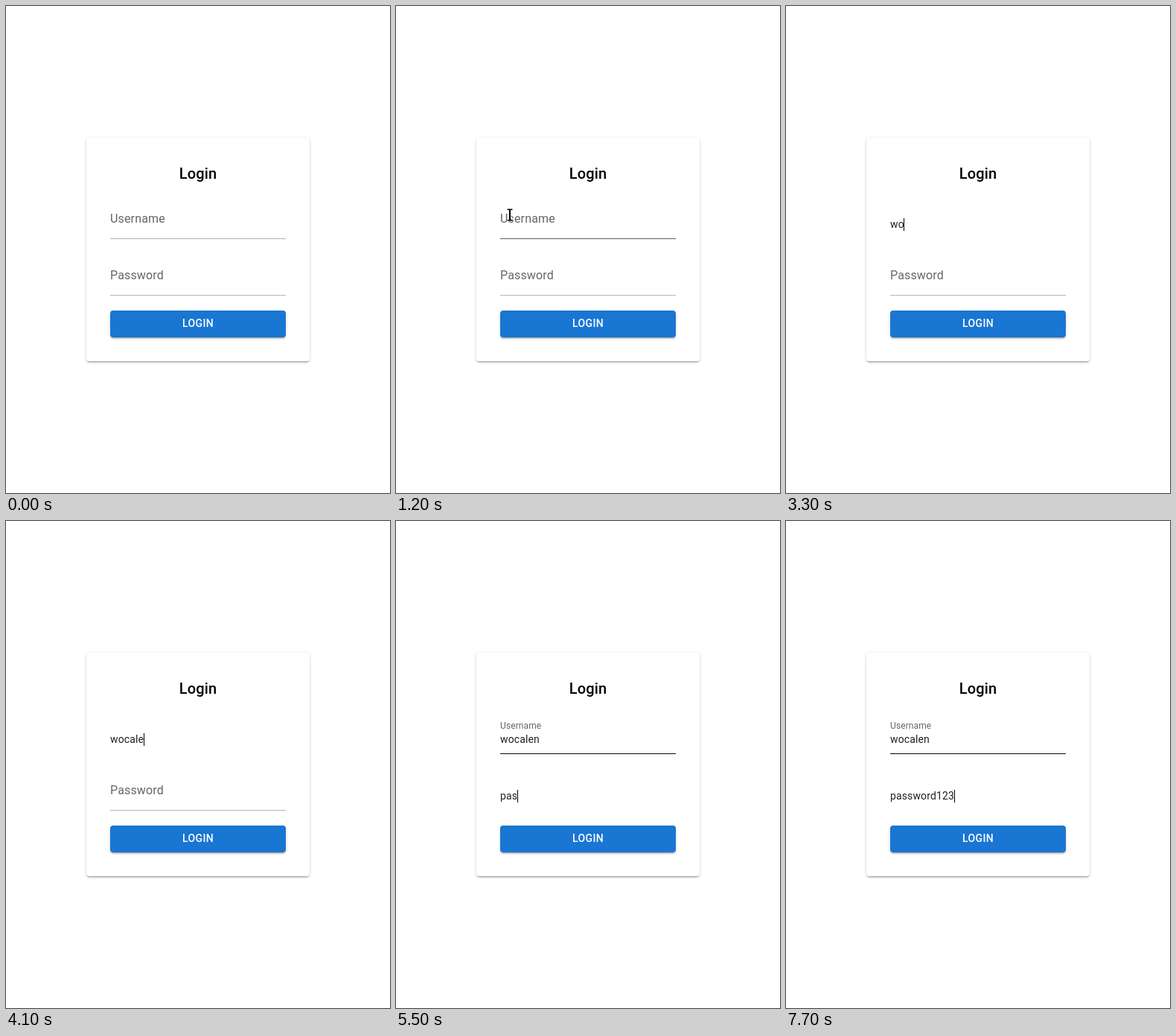
An HTML page for the animation above (8000 ms loop, 516 px wide and 654 px high).

```html
<!DOCTYPE html>
<html lang="en">
<head>
<meta charset="utf-8">
<title>Login form</title>
<style>
  html, body { margin: 0; width: 100%; height: 100%; overflow: hidden; background: #fff; }
  body { position: relative; }
  .card, .button {
    position: absolute;
    border-radius: 4px;
    box-shadow: 0 3px 1px -2px rgba(0,0,0,.2), 0 2px 2px rgba(0,0,0,.14), 0 1px 5px rgba(0,0,0,.12);
  }
  .card { left: 108px; top: 177px; width: 300px; height: 300px; background: #fff; }
  .button {
    left: 140px; top: 409px; width: 236px; height: 36px;
    background: #1976d2;
    animation: button-hover 8s linear infinite;
  }
  svg { position: absolute; left: 0; top: 0; font-family: Roboto, sans-serif; }

  .title { font-size: 20px; font-weight: 500; letter-spacing: .0075em; text-anchor: middle; }
  .action { font-size: 14px; font-weight: 500; letter-spacing: .02857em; text-anchor: middle; fill: #fff; }
  .label { font-size: 16px; letter-spacing: .00938em; fill: #666; }
  .value { font-size: 14px; letter-spacing: .00938em; fill: #212121; white-space: pre; }

  .line { fill: #b5b5b5; }
  .cover { fill: #fff; transform: scaleX(0); transform-origin: 258px 0; }

  #user .label { transform-origin: 140px 291px; animation: user-label 8s step-end infinite; }
  #user .line { animation: user-hover 8s linear infinite; }
  #user .cover { animation: user-focus 8s linear infinite; }
  #pass .label { animation: pass-label 8s step-end infinite; }
  #pass .cover { animation: pass-focus 8s linear infinite; }

  .arrow { opacity: 0; animation: arrow 8s step-end infinite; }
  .beam { opacity: 0; animation: beam 8s step-end infinite; }

  @keyframes button-hover {
    0%, 2.4% { background: #1976d2; }
    3.75% { background: #176dc9; }
    6.25%, 100% { background: #1976d2; }
  }
  @keyframes user-label {
    0% { opacity: 1; transform: none; }
    18.75% { opacity: 0; transform: translateY(-12px) scale(.75); }
    57.5%, 100% { opacity: 1; transform: translateY(-12px) scale(.75); }
  }
  @keyframes pass-label {
    0% { opacity: 1; }
    57.5%, 100% { opacity: 0; }
  }
  @keyframes user-hover {
    0%, 6.25% { fill: #b5b5b5; }
    8.4% { fill: #222; }
    10% { fill: #8b9794; }
    11.25%, 13.75% { fill: #b5b5b5; }
    16.25%, 100% { fill: #0c0c0c; }
  }
  @keyframes user-focus {
    0%, 18.5% { transform: scaleX(0); animation-timing-function: cubic-bezier(0,0,.2,1); }
    21%, 58.61% { transform: scaleX(1); animation-timing-function: cubic-bezier(0,0,.2,1); }
    61.11%, 100% { transform: scaleX(0); }
  }
  @keyframes pass-focus {
    0%, 58.49% { transform: scaleX(0); animation-timing-function: cubic-bezier(0,0,.2,1); }
    60.99%, 100% { transform: scaleX(1); }
  }
  @keyframes arrow {
    0% { opacity: 0; transform: translate(437px, 460px); }
    1.25% { opacity: 1; transform: translate(437px, 460px); }
    2.5% { opacity: 1; transform: translate(370px, 428px); }
    3.75% { opacity: 1; transform: translate(310px, 390px); }
    5% { opacity: 1; transform: translate(262px, 352px); }
    6.25% { opacity: 1; transform: translate(222px, 318px); }
    7.5% { opacity: 1; transform: translate(178px, 270px); }
    8.75% { opacity: 1; transform: translate(146px, 190px); }
    10% { opacity: 1; transform: translate(127px, 254px); }
    12.5% { opacity: 1; transform: translate(128px, 255px); }
    13.75% { opacity: 1; transform: translate(133px, 261px); }
    15%, 100% { opacity: 0; transform: translate(140px, 268px); }
  }
  @keyframes beam {
    0% { opacity: 0; transform: translate(-6px, -4px); }
    15% { opacity: 1; transform: translate(-6px, -4px); }
    16.25% { opacity: 1; transform: translate(-3px, -2px); }
    17.5% { opacity: 1; transform: none; }
    26.25%, 100% { opacity: 0; transform: none; }
  }
</style>
</head>
<body>
<div class="card"></div>
<div class="button"></div>
<svg width="516" height="654" viewBox="0 0 516 654">
  <text class="title" x="258" y="232">Login</text>
  <g id="user">
    <text class="label" x="140" y="291">Username</text>
    <text class="value" x="140" y="298"></text>
    <rect class="line" x="140" y="312" width="236" height="1"/>
    <rect class="cover" x="140" y="312" width="236" height="2"/>
  </g>
  <g id="pass">
    <text class="label" x="140" y="367">Password</text>
    <text class="value" x="140" y="374"></text>
    <rect class="line" x="140" y="388" width="236" height="1"/>
    <rect class="cover" x="140" y="388" width="236" height="2"/>
  </g>
  <text class="action" x="258" y="431">LOGIN</text>
  <rect id="caret" x="140" y="285" width="1" height="17"/>
  <path class="arrow" d="M0 0V15L3.6 11.8L6 17L8.4 16L6.1 10.8H11Z" stroke="#fff" stroke-width="1" paint-order="stroke"/>
  <path class="beam" d="M155.5 276.5H162.5V278H160V291H162.5V292.5H155.5V291H158V278H155.5Z" stroke="#fff" stroke-width="1" paint-order="stroke"/>
</svg>
<script>
  const LOOP = 8000, FOCUS = 1500, TAB = 4600;
  const caret = document.getElementById('caret');

  // Each time is the moment one more character appears.
  const makeField = (id, text, times, caretY) => ({
    value: document.querySelector(`#${id} .value`), text, times, caretY
  });
  const user = makeField('user', 'wocalen', [2100, 3300, 3400, 3500, 3700, 4100, 4400], 285);
  const pass = makeField('pass', 'password123',
    [5000, 5200, 5500, 5700, 5900, 6000, 6200, 6400, 7200, 7300, 7700], 361);

  function type(field, t) {
    const count = field.times.filter(time => time <= t).length;
    const shown = field.text.slice(0, count);
    if (field.value.textContent !== shown) field.value.textContent = shown;
  }

  function draw(t) {
    type(user, t);
    type(pass, t);
    const active = t < TAB ? user : pass;
    const width = active.value.textContent ? active.value.getComputedTextLength() : 0;
    caret.setAttribute('x', Math.floor(140 + width));
    caret.setAttribute('y', active.caretY);
    caret.setAttribute('visibility', t < FOCUS ? 'hidden' : 'visible');
  }

  // Script and keyframes share one starting time.
  const start = performance.now();
  document.getAnimations().forEach(animation => { animation.startTime = start; });

  function tick(now) {
    draw(Math.max(0, now - start) % LOOP);
    requestAnimationFrame(tick);
  }
  draw(0);
  requestAnimationFrame(tick);
</script>
</body>
</html>
```
